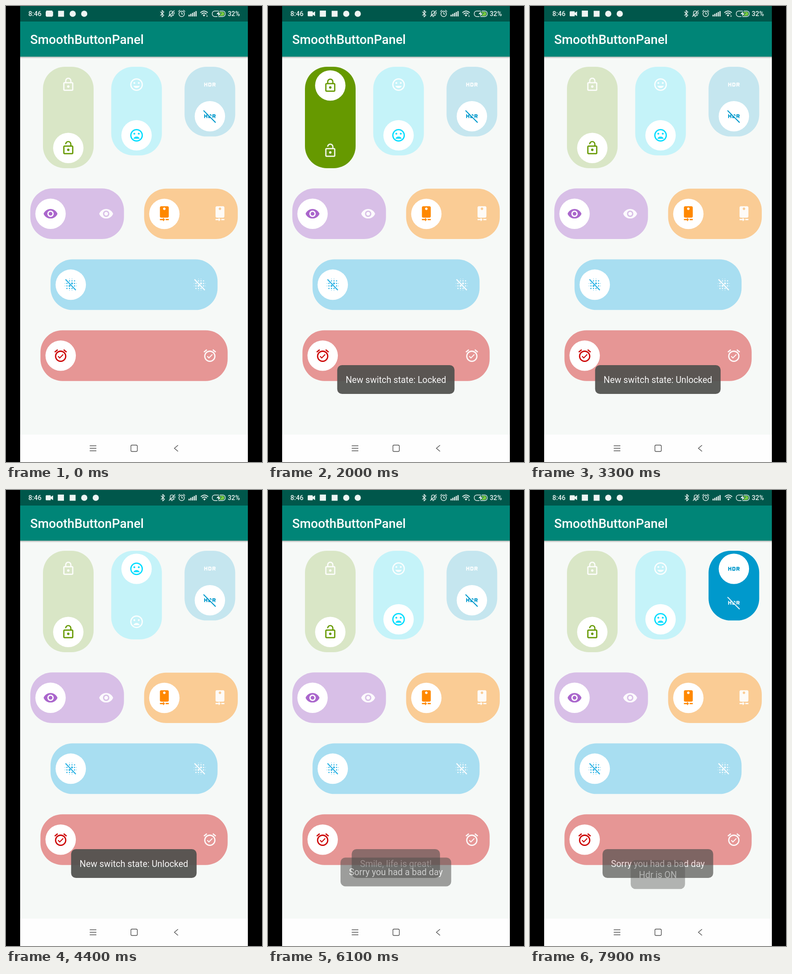
Recreate the animation shown at these times as an HTML page. Size 561 by 998 pixels, loop 8000 ms.

```html
<!DOCTYPE html>
<html lang="en">
<head>
<meta charset="utf-8">
<title>Switches</title>
<style>
  html, body { margin: 0; width: 100%; height: 100%; overflow: hidden; background: #000; }
  svg { display: block; width: 561px; height: 998px; font-family: Roboto, sans-serif; }
</style>
</head>
<body>
<svg id="stage" viewBox="0 0 561 998"></svg>
<script>
const LOOP = 8000;
const DP = 1.386;
const TOAST_MS = 570;

const path = d => `<path d="${d}"/>`;
const dot = (x, y, r) => `<circle cx="${x}" cy="${y}" r="${r}"/>`;
const face = mouth =>
  '<circle cx="12" cy="12" r="9" fill="none" stroke="currentColor" stroke-width="2"/>' +
  dot(8.5, 9.5, 1.5) + dot(15.5, 9.5, 1.5) + path(mouth);

function blurOff() {
  let s = '';
  const grid = [3, 6, 10, 14, 18, 21];
  for (const x of grid) for (const y of grid) {
    const edges = [x, y].filter(v => v === 3 || v === 21).length;
    const mids = [x, y].filter(v => v === 10 || v === 14).length;
    if (x === y || edges === 2 || (edges === 1 && mids === 0)) continue;
    s += dot(x, y, edges ? 0.5 : mids === 2 ? 1.5 : 1);
  }
  return s + '<path d="M3.7 3.7L20 20.6" stroke="currentColor" stroke-width="1.7"/>';
}

const keyhole = 'M12 17c1.1 0 2-.9 2-2s-.9-2-2-2-2 .9-2 2 .9 2 2 2z';
const icons = {
  locked: path(keyhole + 'm6-9h-1V6c0-2.76-2.24-5-5-5S7 3.24 7 6v2H6c-1.1 0-2 .9-2 2v10c0 1.1.9 2 2 2h12c1.1 0 2-.9 2-2V10c0-1.1-.9-2-2-2zM8.9 6c0-1.71 1.39-3.1 3.1-3.1s3.1 1.39 3.1 3.1v2H8.9V6zM18 20H6V10h12v10z'),
  unlocked: path(keyhole + 'm6-9h-1V6c0-2.76-2.24-5-5-5S7 3.24 7 6h1.9c0-1.71 1.39-3.1 3.1-3.1 1.71 0 3.1 1.39 3.1 3.1v2H6c-1.1 0-2 .9-2 2v10c0 1.1.9 2 2 2h12c1.1 0 2-.9 2-2V10c0-1.1-.9-2-2-2zm0 12H6V10h12v10z'),
  happy: face('M12 17.5c2.33 0 4.31-1.46 5.11-3.5H6.89c.8 2.04 2.78 3.5 5.11 3.5z'),
  sad: face('M12 14c-2.33 0-4.31 1.46-5.11 3.5h10.22c-.8-2.04-2.78-3.5-5.11-3.5z'),
  hdr: path('M21 11.5v-1c0-.8-.7-1.5-1.5-1.5H16v6h1.5v-2h1.1l.9 2H21l-.9-2.1c.5-.3.9-.8.9-1.4zm-1.5 0h-2v-1h2v1zm-13-.5h-2V9H3v6h1.5v-2.5h2V15H8V9H6.5v2zM13 9H9.5v6H13c.8 0 1.5-.7 1.5-1.5v-3c0-.8-.7-1.5-1.5-1.5zm0 4.5h-2v-3h2v3z'),
  hdrOff: path('M17.5 15v-2h1.1l.9 2H21l-.9-2.1c.5-.2.9-.8.9-1.4v-1c0-.8-.7-1.5-1.5-1.5H16v4.9l1.1 1.1h.4zm0-4.5h2v1h-2v-1zm-4.5 0v.4l1.5 1.5v-1.9c0-.8-.7-1.5-1.5-1.5h-1.9l1.5 1.5h.4zm-3.5-1l-7-7-1.1 1L6.9 9h-.4v2h-2V9H3v6h1.5v-2.5h2V15H8v-4.9l1.5 1.5V15h3.4l7.6 7.6 1.1-1.1-12.1-12z'),
  eye: path('M12 4.5C7 4.5 2.73 7.61 1 12c1.73 4.39 6 7.5 11 7.5s9.27-3.11 11-7.5c-1.73-4.39-6-7.5-11-7.5zM12 17c-2.76 0-5-2.24-5-5s2.24-5 5-5 5 2.24 5 5-2.24 5-5 5zm0-8c-1.66 0-3 1.34-3 3s1.34 3 3 3 3-1.34 3-3-1.34-3-3-3z'),
  camera: path('M10 20H5v2h5v2l3-3-3-3v2zm4 0v2h5v-2h-5zM17 0H7C5.9 0 5 .9 5 2v14c0 1.1.9 2 2 2h10c1.1 0 2-.9 2-2V2c0-1.1-.9-2-2-2zm-5 6c-1.11 0-2-.9-2-2s.89-2 1.99-2 2 .9 2 2C14 5.1 13.1 6 12 6z'),
  blur: blurOff(),
  alarm: path('M22 5.72l-4.6-3.86-1.29 1.53 4.6 3.86L22 5.72zM7.88 3.39L6.6 1.86 2 5.71l1.29 1.53 4.59-3.85zM12 4c-4.97 0-9 4.03-9 9s4.02 9 9 9c4.97 0 9-4.03 9-9s-4.03-9-9-9zm0 16c-3.87 0-7-3.13-7-7s3.13-7 7-7 7 3.13 7 7-3.13 7-7 7zm-1.46-5.47L8.41 12.4l-1.06 1.06 3.18 3.18 6-6-1.06-1.06-4.93 4.95z')
};

// Switches; "moves" lists [time, thumb y] and "on" the active time span.
const switches = [
  { x: 81, y: 133, w: 111, h: 222, color: '#669900', dim: 0.2, icon: ['unlocked', 'locked'], vertical: true,
    on: [870, 2290],
    moves: [[520, 310.7], [820, 172.5], [890, 172.5], [980, 174], [2130, 174], [2330, 310.7]] },
  { x: 230.6, y: 133, w: 111, h: 194, color: '#00ddff', dim: 0.2, icon: ['sad', 'happy'], vertical: true,
    on: [4430, 5860],
    moves: [[4130, 283], [4370, 172.5], [4460, 172.5], [4600, 174], [5640, 174], [5880, 283]] },
  { x: 391.3, y: 133, w: 111, h: 152.6, color: '#0099cc', dim: 0.2, icon: ['hdrOff', 'hdr'], vertical: true,
    on: [7730, LOOP],
    moves: [[7530, 241.2], [7720, 172.5]] },
  { x: 53.3, y: 399.3, w: 205.2, h: 110.8, color: '#aa66cc', dim: 0.4, icon: ['eye', 'eye'] },
  { x: 302.7, y: 399.8, w: 205.2, h: 110.3, color: '#ff8800', dim: 0.4, icon: ['camera', 'camera'] },
  { x: 97.6, y: 554.5, w: 366, h: 110.8, color: '#33b5e5', dim: 0.4, icon: ['blur', 'blur'] },
  { x: 75.5, y: 709.7, w: 410.2, h: 111, color: '#cc0000', dim: 0.4, icon: ['alarm', 'alarm'] }
];

const toasts = [
  { text: 'New switch state: Locked', w: 257, at: 920 },
  { text: 'New switch state: Unlocked', w: 275, at: 2315 },
  { text: 'Smile, life is great!', w: 193.5, at: 4440 },
  { text: 'Sorry you had a bad day', w: 242.5, at: 5900 },
  { text: 'Hdr is ON', w: 119, at: 7755 }
];

const icon = (name, x, y, color, cls = '') =>
  `<g class="${cls}" transform="translate(${x} ${y}) scale(${DP}) translate(-12 -12)" fill="${color}" color="${color}">${icons[name]}</g>`;

function switchMarkup(s) {
  const cx = s.x + s.w / 2, cy = s.y + s.h / 2;
  const [off, on] = s.icon;
  const thumb = s.vertical ? [cx, s.moves[0][1]] : [s.x + 44.3, cy];
  const ghosts = s.vertical
    ? icon(on, cx, s.y + 39, '#fff') + icon(off, cx, s.y + s.h - 38.7, '#fff')
    : icon(on, s.x + s.w - 39, cy, '#fff');
  return `<g class="switch">
    <rect class="track" x="${s.x}" y="${s.y}" width="${s.w}" height="${s.h}" rx="48" fill="${s.color}" fill-opacity="${s.dim}"/>
    <g opacity=".93">${ghosts}</g>
    <g class="thumb" transform="translate(${thumb})">
      <circle r="33.3" fill="#fff"/>
      ${icon(off, 0, 0, s.color, 'off')}${s.vertical ? icon(on, 0, 0, s.color, 'on') : ''}
    </g></g>`;
}

const toastMarkup = o => `<g class="toast">
  <rect x="${280.2 - o.w / 2}" y="786" width="${o.w}" height="63" rx="10.5" fill="#50504e" fill-opacity=".93"/>
  <text x="280.3" y="825" font-size="19.4" text-anchor="middle" fill="#f6f6f6">${o.text}</text></g>`;

const bars = [0, 1, 2, 3, 4].map(i =>
  `<rect x="${400 + i * 3.8}" y="${19 - i * 2}" width="2.5" height="${4 + i * 2}" rx=".8" fill="#e6efed"/>`).join('');

const statusBar = `
  <rect x="31" width="499" height="34" fill="#00574b"/>
  <g fill="#eef5f3">
    <text x="49" y="22" font-size="14.6" font-weight="500">8:46</text>
    <text x="486" y="22" font-size="14.2" font-weight="500">32%</text>
    <g id="notes">
      <rect x="113.5" y="10" width="13.5" height="13.5"/>
      <rect x="139.5" y="10.5" width="13" height="13"/>
      <circle cx="171.5" cy="17" r="6.8"/><circle cx="196.7" cy="17" r="6.8"/>
    </g>
    <path d="M88.5 11.5h8.2q1.5 0 1.5 1.5v2l5-3.2v10.4l-5-3.2v2q0 1.5-1.5 1.5h-8.2q-1.5 0-1.5-1.5v-8q0-1.5 1.5-1.5z"/>
  </g>
  <g fill="none" stroke="#e6efed" stroke-width="1.4" stroke-linecap="round" stroke-linejoin="round">
    <g id="radio">
      <path d="M338.5 13l7.5 7.3-4 3.7V9.500l4 3.700-7.500 7.300"/>
      <path d="M357.500 20.500h9.500l-1.500-2.200v-3.800q0-3.600-3.600-3.600t-3.600 3.600v3.800zM360.500 23h3M356 23l12.800-13M368.500 13.500v4"/>
    </g>
    <circle cx="385" cy="17.300" r="6"/><path d="M385 13.800v3.700h2.600M378 12l3-2.700M392 12l-3-2.700"/>
    <g id="wifi">
      <path d="M426.500 14.200q7.500-6.500 15 0M429.200 17.300q4.800-4.200 9.600 0" stroke-width="1.900"/>
      <path d="M431.800 19.800q2.200-1.900 4.400 0l-2.200 2.700z" fill="#e6efed" stroke-width=".8"/>
    </g>
    <path id="data" d="M440.500 20v3.200M439.300 22l1.200 1.300 1.200-1.300" stroke-width=".9"/>
    <rect x="452" y="11" width="28.500" height="12.200" rx="5.500"/>
  </g>
  ${bars}
  <path d="M466 12.800h8.500q4 0 4 4.300t-4 4.300H466z" fill="#79c943"/>
  <path d="M468.200 9.500l-8 8.700h4.800l-1.500 6.500 8.200-9h-5z" fill="#fff" stroke="#00574b" stroke-width="1.100"/>`;

const navBar = `
  <rect x="31" y="938" width="499" height="60" fill="#fefefe"/>
  <g fill="none" stroke="#505050" stroke-width="1.400">
    <path d="M183.500 962.500h14.500M183.500 968h14.500M183.500 973.500h14.500"/>
    <rect x="273.700" y="961" width="14" height="14" rx="2.600"/>
    <path d="M377 961.300l-8 6.700 8 6.700"/>
  </g>`;

const stage = document.getElementById('stage');
stage.innerHTML = `
  <defs><linearGradient id="shade" x2="0" y2="1">
    <stop stop-color="#000" stop-opacity=".34"/><stop offset="1" stop-color="#000" stop-opacity="0"/>
  </linearGradient></defs>
  <rect width="561" height="998"/>
  <rect x="31" y="34" width="499" height="904" fill="#f6f9f7"/>
  <rect x="31" y="110" width="499" height="5" fill="url(#shade)"/>
  <rect x="31" y="33.500" width="499" height="77.300" fill="#008577"/>
  <text x="53" y="82.500" font-size="27.700" font-weight="500" fill="#fff">SmoothButtonPanel</text>
  ${statusBar}${navBar}
  ${switches.map(switchMarkup).join('')}
  ${toasts.map(toastMarkup).join('')}`;

const all = sel => [...stage.querySelectorAll(sel)];
const clamp = v => Math.min(1, Math.max(0, v));
const easeOut = u => 1 - (1 - u) ** 2;
const easeInOut = u => u * u * (3 - 2 * u);

function follow(steps, t) {
  let [t0, v0] = steps[0];
  for (const [t1, v1] of steps) {
    if (t < t1) return t1 === t0 ? v0 : v0 + (v1 - v0) * easeInOut(clamp((t - t0) / (t1 - t0)));
    [t0, v0] = [t1, v1];
  }
  return v0;
}

const movers = all('.switch').slice(0, 3).map((el, i) => ({
  ...switches[i],
  track: el.querySelector('.track'),
  thumb: el.querySelector('.thumb'),
  offIcon: el.querySelector('.off'),
  onIcon: el.querySelector('.on')
}));
const toastEls = all('.toast');
const [notes, radio, wifi, data] = ['notes', 'radio', 'wifi', 'data'].map(id => document.getElementById(id));

function draw(t) {
  for (const m of movers) {
    const active = t >= m.on[0] && t < m.on[1];
    m.thumb.setAttribute('transform', `translate(${m.x + m.w / 2} ${follow(m.moves, t)})`);
    m.track.setAttribute('fill-opacity', active ? 1 : m.dim);
    m.offIcon.setAttribute('visibility', active ? 'hidden' : 'visible');
    m.onIcon.setAttribute('visibility', active ? 'visible' : 'hidden');
  }
  toasts.forEach((o, i) => {
    const next = toasts[i + 1];
    const shown = easeOut(clamp((t - o.at) / TOAST_MS));
    const gone = next ? clamp((t - next.at) / TOAST_MS) : 0;
    toastEls[i].setAttribute('opacity', shown * (1 - gone));
    toastEls[i].setAttribute('transform', `translate(0 ${44 * (1 - shown)})`);
  });
  notes.setAttribute('transform', `translate(${-25.3 * (1 - easeInOut(clamp((t - 50) / 400)))} 0)`);
  const idle = (t >= 4000 && t < 5000) || t >= 7000;
  radio.setAttribute('transform', `translate(${idle ? 1.5 : 0} 0)`);
  wifi.setAttribute('transform', `translate(${idle ? 1 : 0} 0)`);
  data.setAttribute('visibility', idle ? 'hidden' : 'visible');
}

const start = performance.now();
function tick() {
  draw((performance.now() - start) % LOOP);
  requestAnimationFrame(tick);
}
tick();
</script>
</body>
</html>
```
